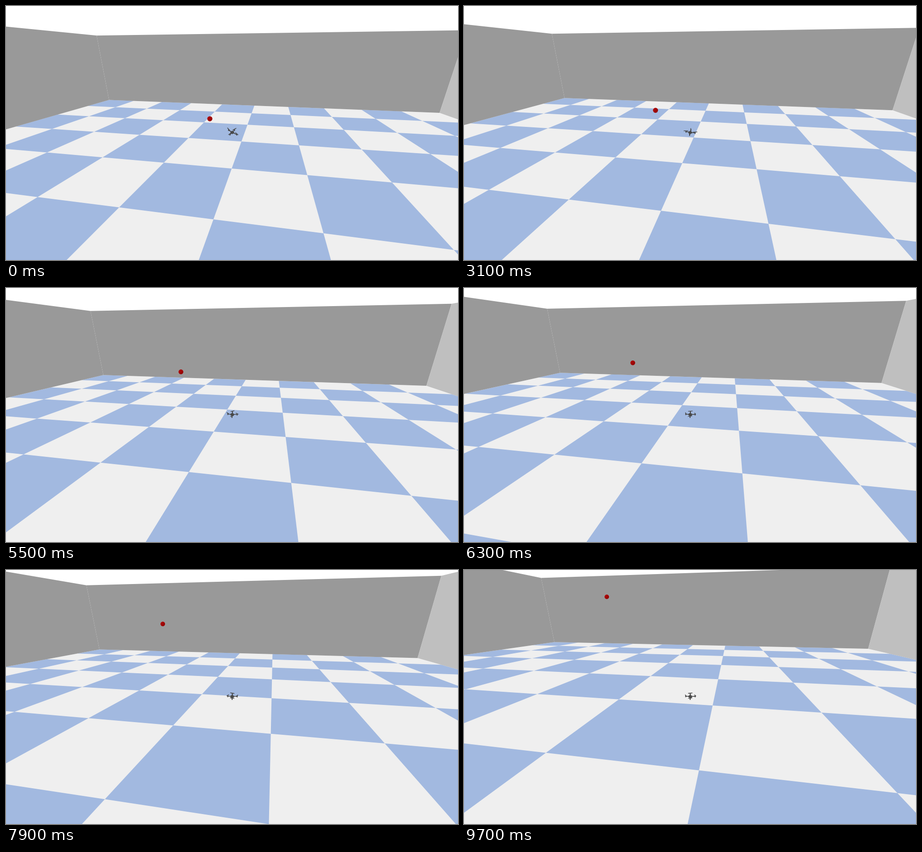
Write an HTML page with a canvas that moves like this. It is 998 px wide and 561 px high and loops after 9.8 s.

```html
<!DOCTYPE html>
<html lang="en">
<head>
<meta charset="utf-8">
<title>Drone in a room</title>
<style>
html, body { margin: 0; width: 100%; height: 100%; overflow: hidden; background: #fff; }
canvas { display: block; }
</style>
</head>
<body>
<canvas id="stage" width="998" height="561"></canvas>
<script>
const ctx = document.getElementById('stage').getContext('2d');
const LOOP = 9800, STEP = 100;
const CX = 499, CY = 280.7, FOCAL = 280.5 / Math.tan(Math.PI / 6);
const rad = deg => deg * Math.PI / 180;
const sinYaw = Math.sin(rad(10)), cosYaw = Math.cos(rad(10));
const sinPitch = Math.sin(rad(20)), cosPitch = Math.cos(rad(20));
const HALF = 4.92, WALL = 2, NEAR = 0.1;

// Camera path: seconds, then x, y and height in tiles
const path = [
  [0, 0.4693, -1.6385, 1.495],
  [1.5, 0.5023, -1.6456, 1.489],
  [3.1, 0.5807, -1.6736, 1.4388],
  [4.7, 0.691, -1.741, 1.353],
  [6.3, 0.8201, -1.8173, 1.2245],
  [7.9, 0.9568, -1.908, 1.057],
  [9.7, 1.1304, -2.0355, 0.8268]
];

const secant = (i, axis) =>
  (path[i + 1][axis] - path[i][axis]) / (path[i + 1][0] - path[i][0]);

function slope(i, axis) {
  if (i === 0) return 0;
  if (i === path.length - 1) return 1.5 * secant(i - 1, axis) - 0.5 * slope(i - 1, axis);
  return (secant(i - 1, axis) + secant(i, axis)) / 2;
}

function cameraAt(t) {
  let i = 0;
  while (i < path.length - 2 && t > path[i + 1][0]) i++;
  const span = path[i + 1][0] - path[i][0], s = (t - path[i][0]) / span;
  return [1, 2, 3].map(axis =>
    path[i][axis] * (1 + 2 * s) * (1 - s) ** 2 +
    path[i + 1][axis] * s * s * (3 - 2 * s) +
    span * s * (1 - s) * (slope(i, axis) * (1 - s) - slope(i + 1, axis) * s));
}

let camera;

function toView([x, y, z]) {
  const dx = x - camera[0], dy = y - camera[1], dz = z - camera[2];
  const ahead = dy * cosYaw - dx * sinYaw;
  return [
    dx * cosYaw + dy * sinYaw,
    ahead * sinPitch + dz * cosPitch,
    ahead * cosPitch - dz * sinPitch
  ];
}

const toScreen = ([x, y, z]) => [CX + FOCAL * x / z, CY - FOCAL * y / z];

function clipNear(points) {
  const kept = [];
  points.forEach((p, i) => {
    const q = points[(i + 1) % points.length];
    if (p[2] > NEAR) kept.push(p);
    if ((p[2] > NEAR) !== (q[2] > NEAR)) {
      const s = (NEAR - p[2]) / (q[2] - p[2]);
      kept.push(p.map((v, k) => v + (q[k] - v) * s));
    }
  });
  return kept;
}

function fillPolygon(color, points) {
  ctx.fillStyle = color;
  ctx.beginPath();
  points.forEach(p => ctx.lineTo(...p));
  ctx.fill();
}

const fillFace = (color, corners) =>
  fillPolygon(color, clipNear(corners.map(toView)).map(toScreen));

const floorRect = (color, x0, y0, x1, y1) =>
  fillFace(color, [[x0, y0, 0], [x1, y0, 0], [x1, y1, 0], [x0, y1, 0]]);

const wall = (color, x0, y0, x1, y1) =>
  fillFace(color, [[x0, y0, 0], [x1, y1, 0], [x1, y1, WALL], [x0, y0, WALL]]);

function drawRoom() {
  const clamp = v => Math.max(-HALF, Math.min(HALF, v));
  floorRect('#efefef', -HALF, -HALF, HALF, HALF);
  for (let x = -5; x < 5; x++)
    for (let y = -5; y < 5; y++)
      if ((x + y) % 2) floorRect('#a2b9e0', clamp(x), clamp(y), clamp(x + 1), clamp(y + 1));
  wall('#999', -HALF, -1, -HALF, HALF);
  wall('#999', -HALF, HALF, HALF, HALF);
  wall('#bfbfbf', HALF, HALF, HALF, 1.5);
}

function drawBall() {
  const view = toView([0, 0, 1]), [x, y] = toScreen(view);
  const r = 0.0205 * FOCAL / view[2];
  const shade = ctx.createLinearGradient(x - r, y - r, x + r, y + r);
  shade.addColorStop(0, '#b50d0d');
  shade.addColorStop(1, '#8c0000');
  ctx.fillStyle = shade;
  ctx.beginPath();
  ctx.arc(x, y, r, 0, 2 * Math.PI);
  ctx.fill();
}

function line(x0, y0, x1, y1, width) {
  ctx.lineWidth = width;
  ctx.beginPath();
  ctx.moveTo(x0, y0);
  ctx.lineTo(x1, y1);
  ctx.stroke();
}

const tiltedArms = [[-8, -5], [5, -5], [10, 5], [-5, 5]];
const levelArms = [[-10, 0], [0, -5], [11, 0], [0, 6]];

function drawDrone(t) {
  const level = 1 - Math.exp(-t / 2.5);
  ctx.save();
  ctx.translate(499.5, 279);
  ctx.strokeStyle = '#444';
  tiltedArms.forEach((arm, i) => {
    const [x, y] = arm.map((v, k) => v + (levelArms[i][k] - v) * level);
    const spin = 1 + t * 24 + i * 1.5;
    const bx = 5 * Math.cos(spin), by = (3.6 - 2 * level) * Math.sin(spin);
    line(0, 0, x, y, 1.6);
    line(x, y - 2, x, y + 2, 2);
    line(x - bx, y - 2 - by, x + bx, y - 2 + by, 1.3);
  });
  fillPolygon('#484848', [[-4, -1], [0, -3.5], [4, -1], [4, 2], [0, 4], [-4, 2]]);
  ctx.restore();
}

function render(now) {
  const t = Math.floor(now % LOOP / STEP) * STEP / 1000;
  camera = cameraAt(t);
  ctx.fillStyle = '#fff';
  ctx.fillRect(0, 0, 998, 561);
  drawRoom();
  drawBall();
  drawDrone(t);
}

let start;
function tick(now) {
  start ??= now;
  render(now - start);
  requestAnimationFrame(tick);
}
render(0);
requestAnimationFrame(tick);
</script>
</body>
</html>
```
